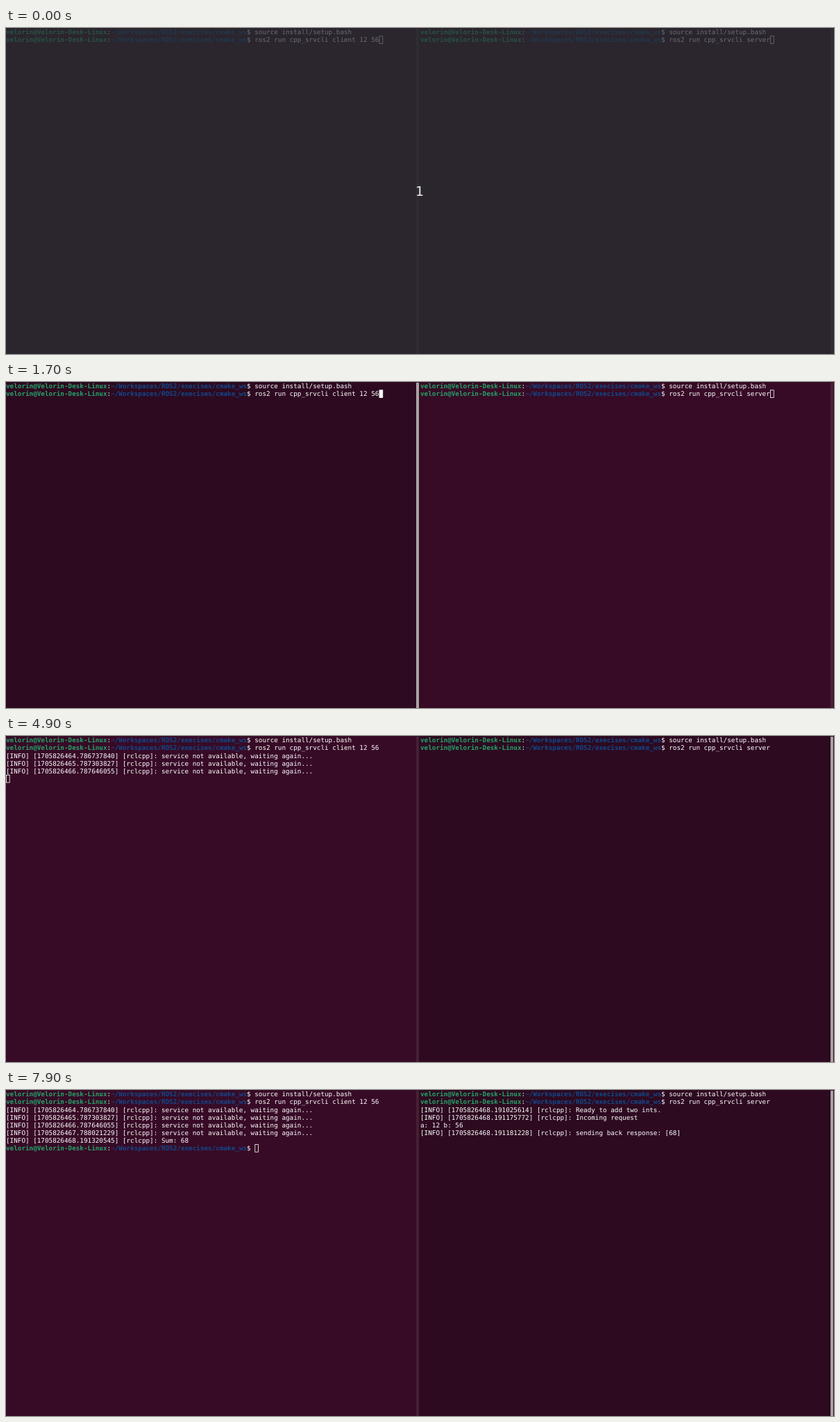
Animation, 1193 px wide and 470 px high, one loop 8000 ms. Source, as an HTML page:

```html
<!DOCTYPE html>
<html lang="en">
<head>
<meta charset="utf-8">
<title>Service and client terminals</title>
<style>
  html, body { margin: 0; width: 100%; height: 100%; overflow: hidden; background: #370b26; }
  svg { display: block; width: 1193px; height: 470px; }
  text { white-space: pre; fill: #fff; text-rendering: geometricPrecision; }
  .term { font: 9.3px "DejaVu Sans Mono", monospace; }
  .user { fill: #26a269; font-weight: bold; }
  .path { fill: #12488b; font-weight: bold; }
  .count { font: 19px "DejaVu Sans", sans-serif; fill: #ececec; text-anchor: middle; }
</style>
</head>
<body>
<svg id="stage" viewBox="0 0 1193 470"></svg>
<script>
const LOOP = 8000, CELL = 5.6, ROW = 11.15, TOP = 0.25, BASE = 8.95;
const USER = 'velorin@Velorin-Desk-Linux';
const PATH = '~/Workspaces/ROS2/execises/cmake_ws';
const PROMPT_COLS = 64;
const stage = document.getElementById('stage');

function add(tag, attrs, parent = stage, text = '') {
  const el = document.createElementNS('http://www.w3.org/2000/svg', tag);
  for (const key in attrs) el.setAttribute(key, attrs[key]);
  if (text) el.textContent = text;
  parent.appendChild(el);
  return el;
}

const info = (stamp, text) => `[INFO] [1705826${stamp}] [rclcpp]: ${text}`;
const waiting = stamp => info(stamp, 'service not available, waiting again...');

// lines: [time, text, isPrompt]; cursor: [time, row, column, visible]
const panes = [
  {
    x: 0, left: 0, width: 595, bar: 591, focus: [600, 4300],
    lines: [
      [0, 'source install/setup.bash', true],
      [0, 'ros2 run cpp_srvcli client 12 56', true],
      [2800, waiting('464.786737840')],
      [3800, waiting('465.787303827')],
      [4800, waiting('466.787646055')],
      [5800, waiting('467.788021229')],
      [6200, info('468.191320545', 'Sum: 68')],
      [6300, '', true]
    ],
    cursor: [
      [0, 1, PROMPT_COLS + 32, 1], [1100, 1, 0, 0], [1700, 1, PROMPT_COLS + 32, 1],
      [1800, 2, 0, 1], [2300, 2, 0, 0], [2900, 3, 0, 1], [3500, 3, 0, 0],
      [4100, 4, 0, 1], [4800, 5, 0, 1], [5800, 6, 0, 1], [6200, 7, 0, 1],
      [6300, 7, PROMPT_COLS, 1]
    ]
  },
  {
    x: 597, left: 595, width: 598, bar: 1188, focus: [4300, LOOP],
    lines: [
      [0, 'source install/setup.bash', true],
      [0, 'ros2 run cpp_srvcli server', true],
      [6200, info('468.191025614', 'Ready to add two ints.')],
      [6200, info('468.191175772', 'Incoming request')],
      [6200, 'a: 12 b: 56'],
      [6200, info('468.191181228', 'sending back response: [68]')]
    ],
    cursor: [
      [0, 1, PROMPT_COLS + 26, 1], [4900, 1, 0, 0], [5500, 1, PROMPT_COLS + 26, 1],
      [6100, 2, 0, 1], [6200, 6, 0, 1], [6700, 6, 0, 0], [7300, 6, 0, 1], [7900, 6, 0, 0]
    ]
  }
];

for (const pane of panes) {
  pane.back = add('rect', { x: pane.left, y: 0, width: pane.width, height: 470 });
  pane.thumb = add('rect', { x: pane.bar, y: 1, width: 4, height: 469 });
  pane.texts = pane.lines.map(([, text, isPrompt], row) => {
    const el = add('text', { class: 'term', x: pane.x, y: TOP + BASE + row * ROW });
    if (isPrompt) {
      add('tspan', { class: 'user' }, el, USER);
      add('tspan', {}, el, ':');
      add('tspan', { class: 'path' }, el, PATH);
      add('tspan', {}, el, '$ ');
    }
    add('tspan', {}, el, text);
    return el;
  });
  pane.caret = add('rect', { width: CELL - 0.8, height: ROW - 0.4, stroke: '#fff', 'stroke-width': 0.8 });
}

const veil = add('g', {});
add('rect', { width: 1193, height: 470, fill: '#273133', opacity: 0.7 }, veil);
add('text', { class: 'count', x: 596, y: 242 }, veil, '1');

function show(el, on) {
  el.setAttribute('visibility', on ? 'visible' : 'hidden');
}

function drawPane(pane, t) {
  const active = t >= pane.focus[0] && t < pane.focus[1];
  pane.back.setAttribute('fill', active ? '#2d0a20' : '#370b26');
  pane.thumb.setAttribute('fill', active ? '#a9a3a4' : '#472035');
  pane.texts.forEach((el, i) => show(el, t >= pane.lines[i][0]));

  const [, row, col, on] = pane.cursor.filter(step => t >= step[0]).pop();
  pane.caret.setAttribute('x', pane.x + col * CELL + 0.4);
  pane.caret.setAttribute('y', TOP + row * ROW + 0.3);
  pane.caret.setAttribute('fill', active ? '#fff' : 'none');
  show(pane.caret, on);
}

const start = performance.now();
function draw(now) {
  const t = Math.max(0, now - start) % LOOP;
  panes.forEach(pane => drawPane(pane, t));
  show(veil, t < 100);
  requestAnimationFrame(draw);
}
draw(start);
</script>
</body>
</html>
```
